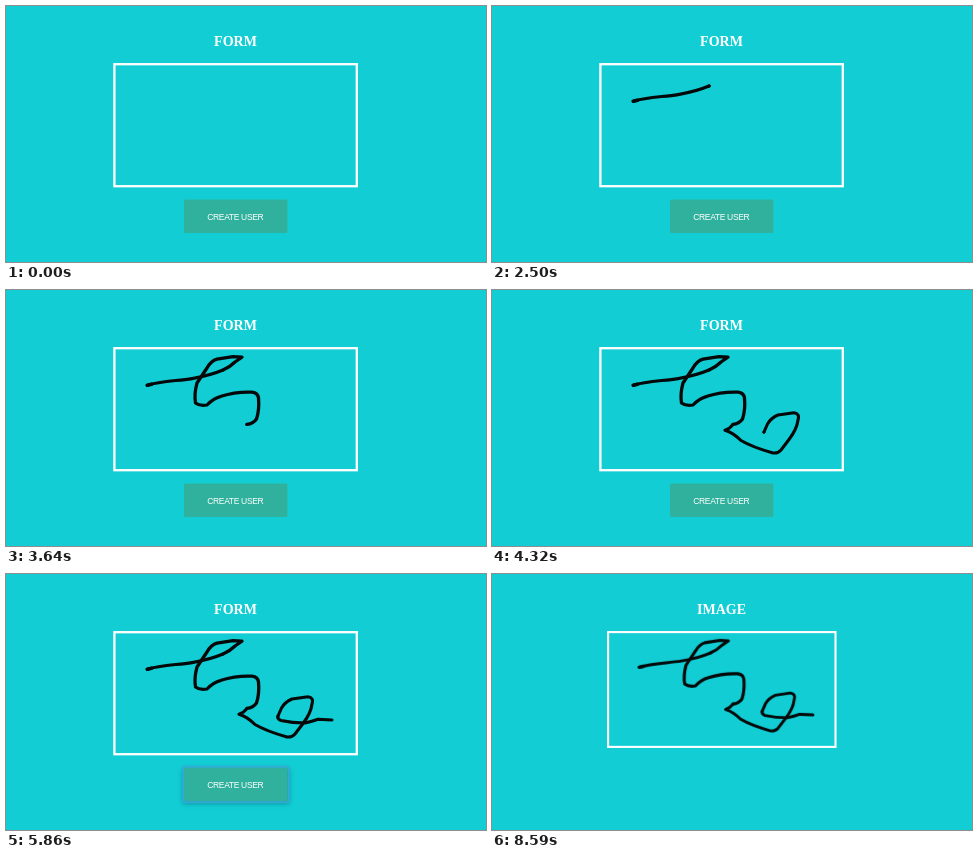
These frames come from a looping animation (480x256 px, 8630 ms). An HTML page:

```html
<!DOCTYPE html>
<html lang="en">
<head>
<meta charset="utf-8">
<title>Form</title>
<style>
  html, body { margin: 0; width: 100%; height: 100%; overflow: hidden; background: #12ced4; }
  svg { display: block; width: 480px; height: 256px; }

  .form, .image, .ring, .ink, .stroke, .shade { animation: 8630ms linear infinite; }
  .form, .image, .ring, .ink { animation-timing-function: step-end; }

  .title { font: bold 14px "Liberation Serif", Times, serif; fill: #fff; text-anchor: middle; }
  .frame { fill: none; stroke: #fff; }
  .label { font: 8.5px "Liberation Sans", Arial, sans-serif; letter-spacing: -.33px; fill: #fff; }

  .form { animation-name: form; }
  .image { animation-name: image; }
  .ring { animation-name: ring; fill: none; stroke: #3ba9dd; stroke-width: 1.8; }
  .shade { animation-name: shade; fill: #0a7188; filter: blur(2.5px); }

  .ink { animation-name: ink; fill: none; stroke: #050808; stroke-width: 3.1; stroke-linecap: round; stroke-linejoin: round; }
  .stroke { stroke-dasharray: 1 2; }
  .a { animation-name: a; }
  .b { animation-name: b; stroke-width: 3.3; }
  .c { animation-name: c; }
  .d { animation-name: d; }

  /* The saved picture replaces the form at 6000 ms. */
  @keyframes form { 0% { visibility: visible } 69.52%, 100% { visibility: hidden } }
  @keyframes image { 0% { visibility: hidden } 69.52%, 100% { visibility: visible } }
  @keyframes ink {
    0% { visibility: hidden; transform: none }
    24.33% { visibility: visible; transform: none }
    69.52%, 100% { visibility: visible; transform: translate(14.5px, 3.7px) scale(.94) }
  }

  /* Hover, then press. */
  @keyframes shade { 0%, 60.8% { opacity: 0 } 62.9%, 100% { opacity: .6 } }
  @keyframes ring { 0% { opacity: 0 } 67.2%, 100% { opacity: .85 } }

  /* Each part of the pen line follows the one before. */
  @keyframes a { 0%, 24.33% { stroke-dashoffset: 1.1 } 24.34% { stroke-dashoffset: 1 } 28.96%, 100% { stroke-dashoffset: 0 } }
  @keyframes b { 0%, 28.96% { stroke-dashoffset: 1.1 } 28.97% { stroke-dashoffset: 1 } 42.17%, 100% { stroke-dashoffset: 0 } }
  @keyframes c { 0%, 42.17% { stroke-dashoffset: 1.1 } 42.18% { stroke-dashoffset: 1 } 50.05%, 100% { stroke-dashoffset: 0 } }
  @keyframes d { 0%, 50.05% { stroke-dashoffset: 1.1 } 50.06% { stroke-dashoffset: 1 } 53.88%, 100% { stroke-dashoffset: 0 } }
</style>
</head>
<body>
<svg viewBox="0 0 480 256">
  <g class="form">
    <text class="title" x="229.5" y="40">FORM</text>
    <rect class="frame" x="108.4" y="58.2" width="242.4" height="122" stroke-width="2.3"/>
    <rect class="shade" x="176.5" y="194" width="107" height="36" rx="2"/>
    <rect x="178" y="193.5" width="103.5" height="33.5" rx="1.5" fill="#30b19d"/>
    <rect class="ring" x="177.2" y="192.7" width="105.6" height="35.4" rx="2"/>
    <text class="label" x="201.2" y="213.6">CREATE USER</text>
  </g>

  <g class="image">
    <text class="title" x="229.5" y="40">IMAGE</text>
    <rect class="frame" x="116.1" y="58.1" width="227.4" height="114.8" stroke-width="2.1"/>
  </g>

  <g class="ink">
    <path d="M141.5 95.2l4-.9" stroke-width="3.7"/>
    <path class="stroke a" pathLength="1" d="M141 95.3C155 91 171 91 186 88.6Q204 85.5 217 80"/>
    <path class="stroke b" pathLength="1" d="M217 80Q224 77 229 72L236 67.2L227 66.6L211 69.2Q205 71 201 78L191 93Q188 104 189.5 113Q194 116.5 201 115Q207 108.5 215 106.3Q230 101.5 246 102.2Q252 103 252.5 108Q253.5 120 250.5 129Q247 134 241 134.3"/>
    <path class="stroke c" pathLength="1" d="M241 134.3Q238 138.5 233 140.2Q241 142.5 249 150.5Q260 157 281 163Q286 163.5 289 160L297 149.5Q305 139 306 130Q308 123.5 302 122.7L286 125Q279 128 275.5 134L272 142"/>
    <path class="stroke d" pathLength="1" d="M272 142Q271 145 275 146.5Q286 149 299 149Q306 147.5 312 145.3L326 146"/>
  </g>
</svg>
</body>
</html>
```
